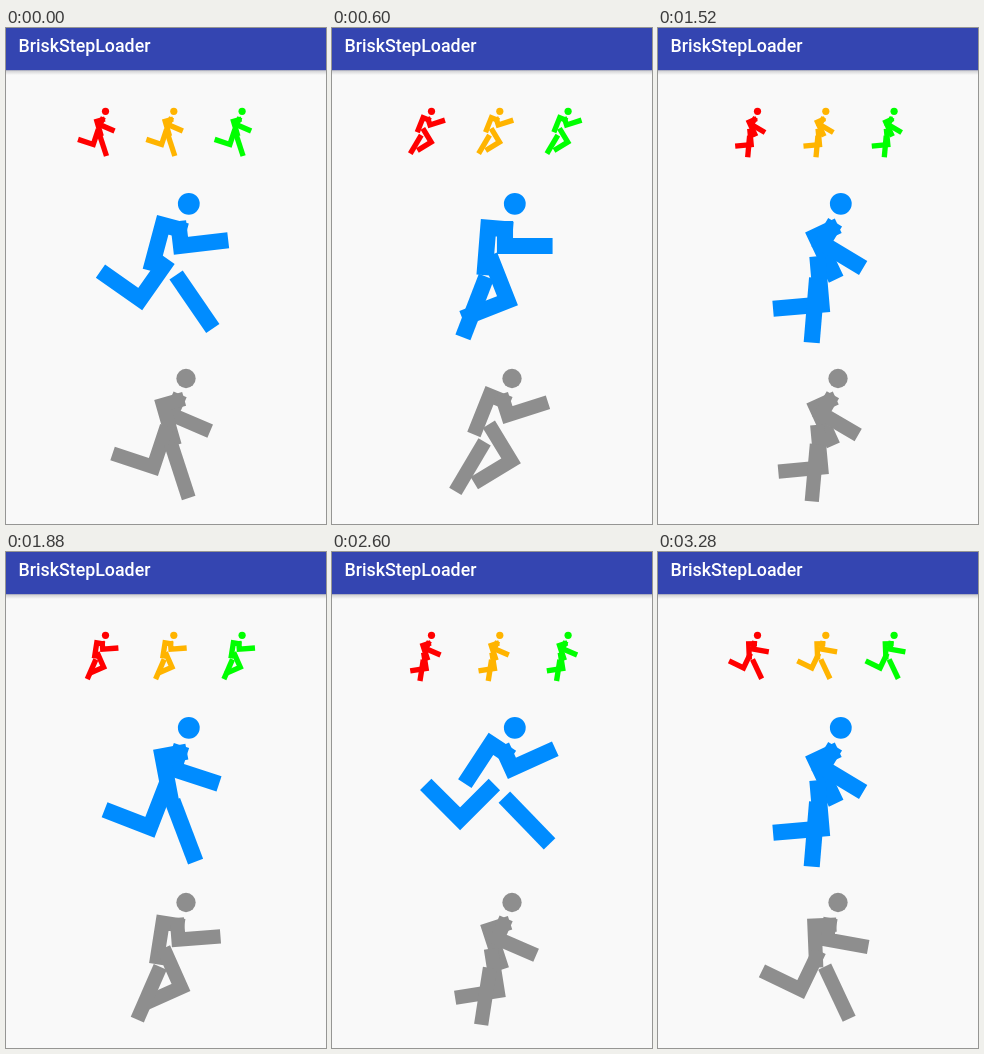
An HTML page with a canvas that plays this animation: 320 px wide and 496 px high, repeating every 3.32 s.

```html
<!DOCTYPE html>
<html lang="en">
<head>
<meta charset="utf-8">
<title>Runner loader</title>
<style>
  html, body { margin: 0; width: 320px; height: 496px; overflow: hidden; background: #f9f9f9; }
  header {
    position: absolute; left: 0; top: 0; width: 320px; height: 42px;
    box-sizing: border-box; padding-left: 12.5px;
    background: #3445b1; color: #fff;
    font: 500 17.8px/36px Roboto, sans-serif; white-space: nowrap;
  }
  header::after {
    content: ""; position: absolute; left: 0; top: 42px; width: 320px; height: 5px;
    background: linear-gradient(#9498b4, #d6d6d8 25%, #f9f9f9);
  }
  canvas { position: absolute; left: 0; top: 0; }
</style>
</head>
<body>
<header>BriskStepLoader</header>
<canvas id="stage" width="320" height="496"></canvas>
<script>
const ctx = document.getElementById('stage').getContext('2d');
const LOOP = 3320, STEP = 40, RAD = Math.PI / 180;

// Running phase over time: each whole unit is one swing, odd swings go backwards.
const times = [0, 600, 1000, 1520, 2240, 2600, 3280];
const calm = [-0.3, 0.84, 1.606, 2.557, 3.92, 4.598, 5.78];
const quick = [-0.118, 1.265, 2.221, 3.447, 5.091, 5.99, 7.447];

const runners = [
  { x: 99.5, y: 83.3, size: 0.331, color: '#ff0000', pace: calm },
  { x: 167.8, y: 83.3, size: 0.331, color: '#ffb400', pace: calm },
  { x: 236.1, y: 83.3, size: 0.331, color: '#00ff00', pace: calm },
  { x: 182.8, y: 175.8, size: 1, color: '#008cff', pace: quick },
  { x: 180, y: 350.5, size: 0.885, color: '#8e8e8e', pace: calm }
];

const ARM = [[0, -8], [0, 16.8], [47.6, 16.8]];
const BENT_LEG = [[3.5, -5.1], [3.5, 43.4], [-45.1, 43.4]];
const STRAIGHT_LEG = [[0, 17], [0, 82]];

function swing(pace, ms) {
  let i = 0;
  while (i < times.length - 2 && ms >= times[i + 1]) i++;
  const k = (ms - times[i]) / (times[i + 1] - times[i]);
  const q = pace[i] + (pace[i + 1] - pace[i]) * k;
  return Math.abs(q - 2 * Math.round(q / 2));
}

function limb(points, x, y, degrees) {
  ctx.save();
  ctx.translate(x, y);
  ctx.rotate(degrees * RAD);
  ctx.beginPath();
  for (const [px, py] of points) ctx.lineTo(px, py);
  ctx.stroke();
  ctx.restore();
}

// Coordinates are relative to the centre of the head.
function drawRunner({ x, y, size, color, pace }, ms) {
  const p = swing(pace, ms);
  const stride = 45 - 90 * p;
  ctx.save();
  ctx.translate(x, y);
  ctx.scale(size, size);
  ctx.fillStyle = ctx.strokeStyle = color;
  ctx.lineWidth = 16.1;
  ctx.beginPath();
  ctx.arc(0, 0, 10.9, 0, 2 * Math.PI);
  ctx.fill();
  limb(ARM, -9.8, 25.3, -26 + 164 * p);
  limb(ARM, -9.8, 25.3, 125 - 170 * p);
  limb(BENT_LEG, -26.5, 57.8, stride * 1.02);
  limb(STRAIGHT_LEG, -22.3, 57.1, -stride);
  ctx.restore();
}

const start = performance.now();
function draw() {
  const elapsed = (performance.now() - start) % LOOP;
  const ms = Math.floor(elapsed / STEP) * STEP;
  ctx.clearRect(0, 0, 320, 496);
  for (const runner of runners) drawRunner(runner, ms);
  requestAnimationFrame(draw);
}
draw();
</script>
</body>
</html>
```
